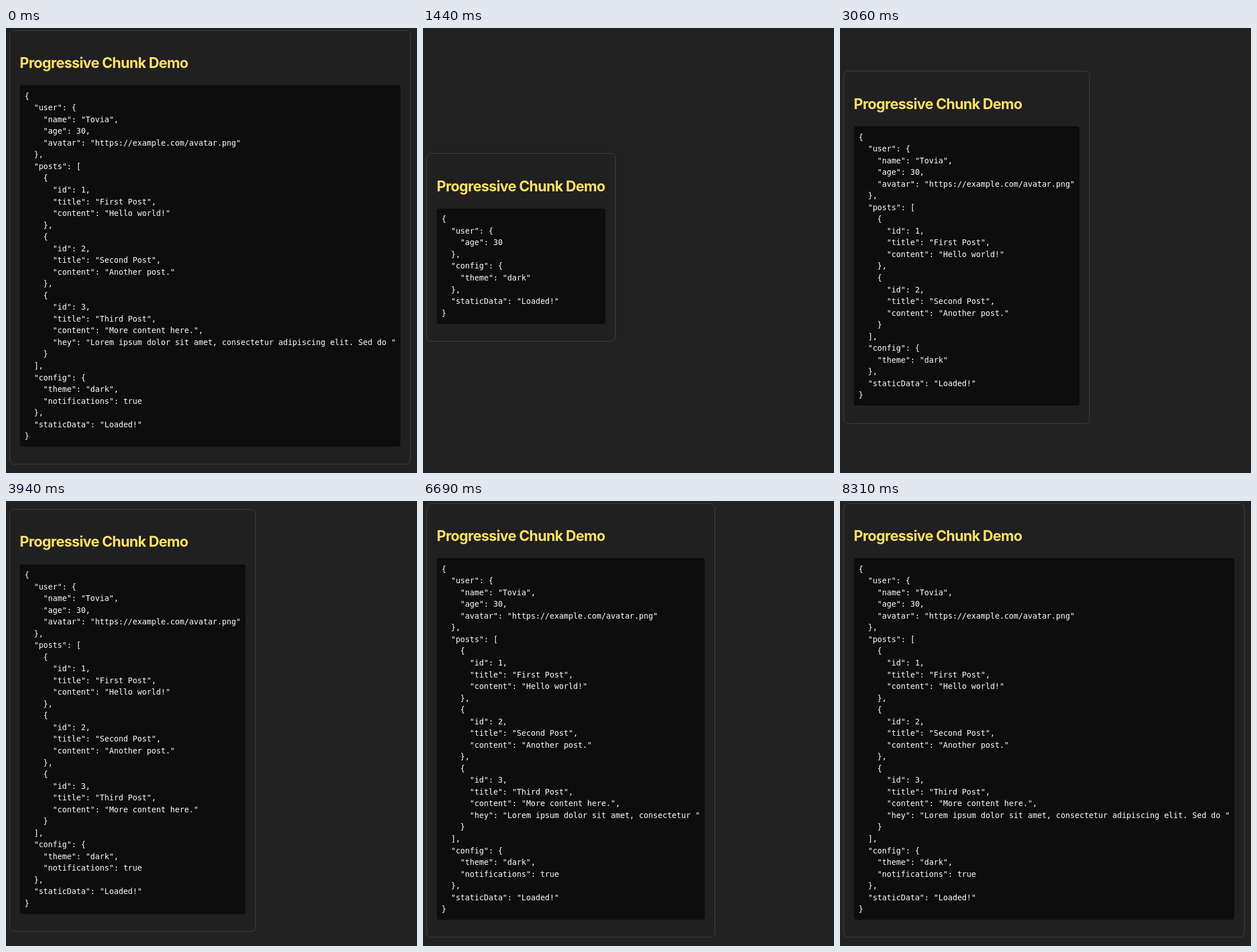
Animation, 719 px wide and 779 px high, one loop 9.12 s. Source, as an HTML page:

```html
<!DOCTYPE html>
<html lang="en">
<head>
<meta charset="utf-8">
<title>Progressive Chunk Demo</title>
<style>
  html, body { margin: 0; width: 100%; height: 100%; overflow: hidden; background: #212121; }
  #stage { display: flex; align-items: center; height: 768px; padding-left: 6.3px; }
  #card {
    box-sizing: border-box; padding: 16.8px 16.8px 30.3px;
    border: 1px solid #414141; border-radius: 8.4px; background: #202020;
  }
  h2 {
    margin: 21.8px 0 19.4px; white-space: nowrap; color: #ffe066;
    font: 700 25.2px/37.8px Inter, sans-serif; letter-spacing: -0.73px;
  }
  pre {
    margin: 0; padding: 8.4px; min-width: 278.5px; border-radius: 4.2px;
    background: #0d0d0d; color: #fff;
    font: 13.66px/20.53px "DejaVu Sans Mono", monospace;
  }
</style>
</head>
<body>
<div id="stage">
  <div id="card">
    <h2>Progressive Chunk Demo</h2>
    <pre id="json"></pre>
  </div>
</div>
<script>
const LOOP = 9120, RESET = 1440;
const words = "Lorem ipsum dolor sit amet, consectetur adipiscing elit. Sed do".split(" ");
const wordTimes = [4690, 5060, 5500, 5880, 6310, 6690, 7060, 7500, 7880, 8310];
const output = document.getElementById("json");

// Everything received by time t; undefined keys are dropped by JSON.stringify.
function received(t) {
  const from = (start, value) => t >= start ? value : undefined;
  const wordCount = wordTimes.filter(start => t >= start).length;
  const hey = words.slice(0, wordCount).map(word => word + " ").join("");
  const posts = [
    { id: 1, title: "First Post", content: "Hello world!" },
    { id: 2, title: "Second Post", content: "Another post." },
    { id: 3, title: "Third Post", content: "More content here.", hey: hey || undefined }
  ];
  return {
    user: {
      name: from(1880, "Tovia"),
      age: 30,
      avatar: from(2310, "https://example.com/avatar.png")
    },
    posts: from(3060, posts.slice(0, t >= 3940 ? 3 : 2)),
    config: { theme: "dark", notifications: from(3500, true) },
    staticData: "Loaded!"
  };
}

function draw(now) {
  const t = now % LOOP;
  // The finished document stays up until the stream restarts.
  const text = JSON.stringify(received(t < RESET ? LOOP : t), null, 2);
  if (output.textContent !== text) output.textContent = text;
  requestAnimationFrame(draw);
}
draw(0);
</script>
</body>
</html>
```
